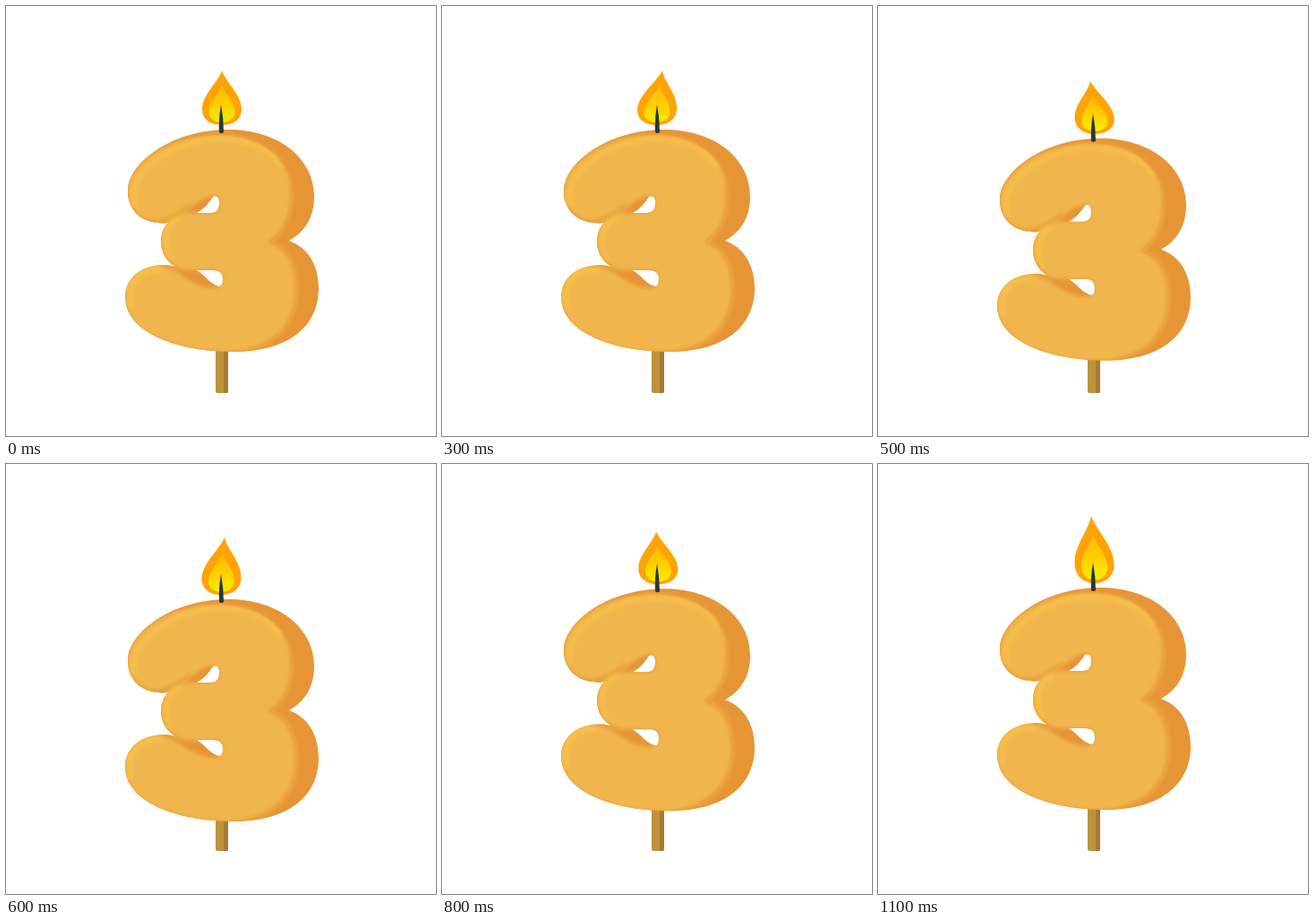
An HTML page that plays this animation: 480 px wide and 480 px high, repeating every 1.2 s.

```html
<!DOCTYPE html>
<html lang="en">
<head>
<meta charset="utf-8">
<title>Birthday candle</title>
<style>
  html, body { margin: 0; width: 100%; height: 100%; overflow: hidden; background: #fff; }
  svg { display: block; width: 100%; height: 100%; }
</style>
</head>
<body>
<svg viewBox="0 0 480 480">
  <defs>
    <linearGradient id="glow" x1="0" y1="0" x2="0" y2="1">
      <stop offset="0" stop-color="#ffb804"/>
      <stop offset=".55" stop-color="#ffd000"/>
      <stop offset="1" stop-color="#f6ee00"/>
    </linearGradient>
    <filter id="soft" x="-10%" y="-10%" width="120%" height="120%"><feGaussianBlur stdDeviation="2"/></filter>
    <path id="front" d="M136 206C138 172 186 144 236 144C288 144 319 172 319 212C319 236 310 254 296 263
      C315 269 325 290 325 316C325 360 296 386 246 386C188 386 133 364 133 326C133 303 150 290 170 290
      C192 290 204 314 232 315Q242 314 242 305Q242 295 232 295L205 295C186 295 173 281 173 263
      C173 244 186 231 205 231L228 231Q238 231 238 221Q238 211 230 212C212 214 198 240 166 241
      C148 241 135 224 136 206Z"/>
    <path id="solid" clip-rule="evenodd" fill-rule="evenodd" d="M136 206C136 176 184 138 248 138C304 138 344 170 344 212
      C344 236 334 252 316 262C336 269 349 288 349 315C349 360 312 386 255 386C190 386 133 364 133 325
      C133 303 152 289 177 289C182 289 185 290 189 291C179 285 173 275 173 263C173 254 176 246 182 241
      C179 243 174 243 170 242C148 241 135 224 136 206Z
      M213 231C222 226 227 219 231 213Q238 210 238 220Q238 231 228 231Z
      M213 295L232 295Q242 295 242 305Q242 313 238 313C228 311 222 300 213 295Z"/>
    <clipPath id="solidClip"><use href="#solid"/></clipPath>
    <clipPath id="frontClip"><use href="#front"/></clipPath>
  </defs>
  <path d="M234 375H248V430Q248 432 246 432H236Q234 432 234 430Z" fill="#bd923c"/>
  <path d="M243 375H248V430Q248 432 246 432H243Z" fill="#a67c34"/>
  <g id="candle">
    <use href="#solid" fill="#e69536"/>
    <g clip-path="url(#solidClip)">
      <use href="#front" fill="#f0b64d" filter="url(#soft)"/>
      <g clip-path="url(#frontClip)" fill="none" stroke-linecap="round" filter="url(#soft)">
        <path d="M143 222C133 190 184 148 238 148C270 148 296 160 306 178" stroke="#f8c04b" stroke-width="5"/>
        <path d="M139 335C133 307 150 293 172 294M182 283C174 266 176 247 192 237" stroke="#f8c04b" stroke-width="6"/>
        <path d="M136 216C140 232 152 241 168 241Q186 238 205 222M173 252Q170 280 190 294" stroke="#e99c39" stroke-width="3"/>
        <path d="M319 200C321 236 310 254 296 263C315 269 325 290 325 316C325 350 306 376 270 386" stroke="#e99c3a" stroke-width="4"/>
      </g>
    </g>
    <path id="outer" fill="#ffa305"/>
    <path id="inner" fill="url(#glow)"/>
    <path d="M240 110Q237 128 238 141Q240.500 143 243 141Q243 126 240 110Z" fill="#26383a"/>
  </g>
</svg>
<script>
  const LOOP = 1200, STEP = 100;
  const FLAME_BASE = 133;
  const heights = [61, 75, 70, 61, 72, 59, 64, 68, 59, 63, 70, 75];
  const sways = [0, -3, 2, 5, -4, -4, 3, 7, -2, -4, 2, -3];
  const byId = id => document.getElementById(id);
  const candle = byId("candle"), outer = byId("outer"), inner = byId("inner");

  const ease = p => (1 - Math.cos(Math.PI * Math.min(1, Math.max(0, p)))) / 2;
  const sink = t => 13 * (ease((t - 300) / 300) - ease((t - 600) / 250));

  // Teardrop bent sideways: the tip follows the sway, the bulb leans against it.
  function teardrop(halfWidth, size, lift, height, sway) {
    const at = (side, k) => {
      const level = lift + k * size;
      const x = 241 + side * halfWidth + sway * (1.3 * level * level - 0.3);
      return `${x.toFixed(2)} ${(FLAME_BASE - level * height).toFixed(2)}`;
    };
    return `M${at(0, 1)}C${at(-0.2, 0.78)} ${at(-1, 0.56)} ${at(-1, 0.29)}` +
      `C${at(-1, 0.1)} ${at(-0.55, 0)} ${at(0, 0)}` +
      `C${at(0.55, 0)} ${at(1, 0.1)} ${at(1, 0.29)}` +
      `C${at(1, 0.56)} ${at(0.2, 0.78)} ${at(0, 1)}Z`;
  }

  function draw(now) {
    const step = Math.floor((now % LOOP) / STEP);
    const height = heights[step], sway = sways[step];
    candle.setAttribute("transform", `translate(0 ${sink(step * STEP).toFixed(2)})`);
    outer.setAttribute("d", teardrop(22, 1, 0, height, sway));
    inner.setAttribute("d", teardrop(14.5, 0.67, 0.05, height, sway));
  }

  function tick(now) {
    draw(now);
    requestAnimationFrame(tick);
  }
  draw(0);
  requestAnimationFrame(tick);
</script>
</body>
</html>
```
